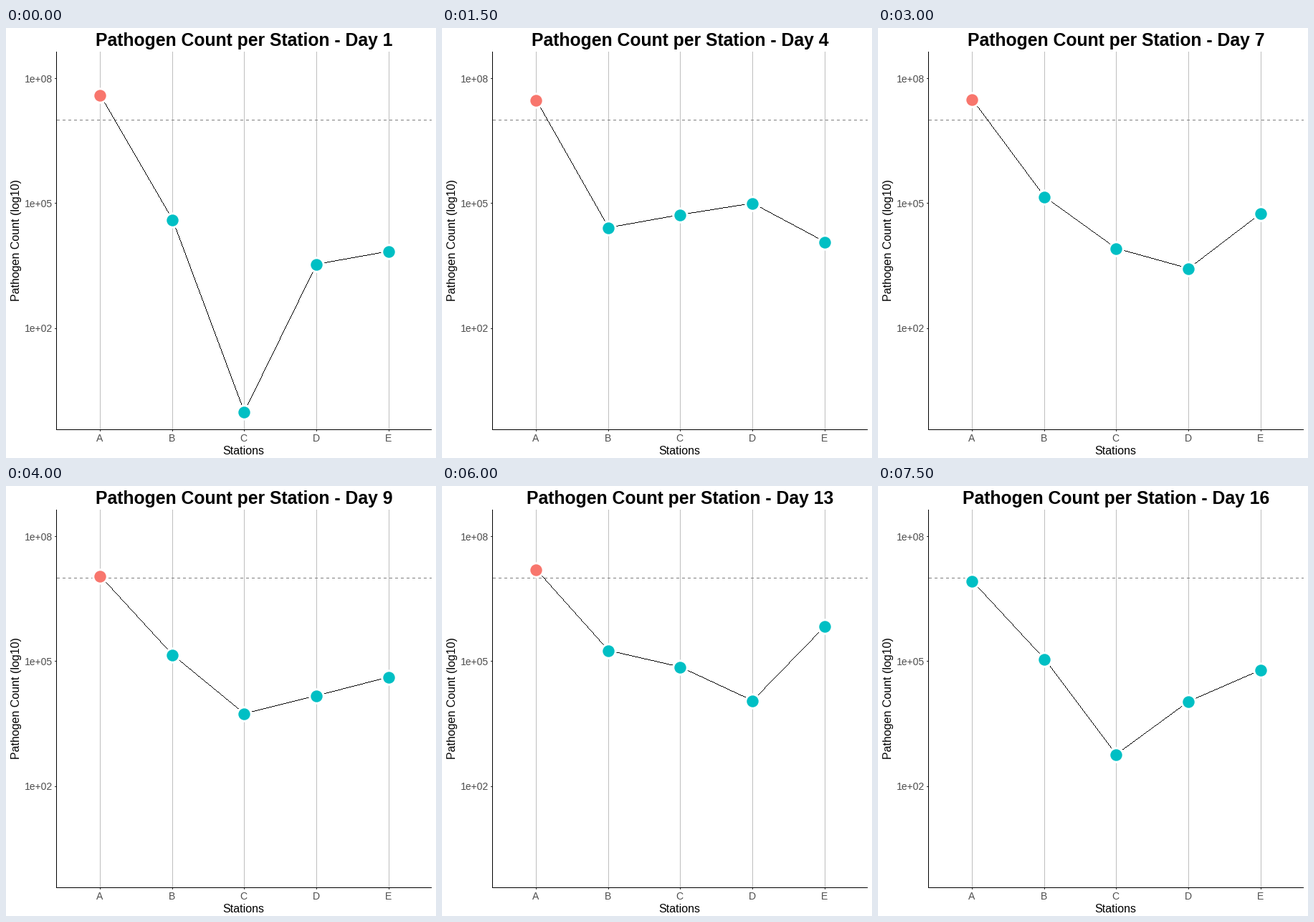
A matplotlib script that plays this animation: 600x600 px, repeating every 8000 ms.

```python
import matplotlib.pyplot as plt
import numpy as np
from matplotlib.animation import FuncAnimation
from matplotlib.patches import Circle

PX = 0.72  # points per pixel at 100 dpi
RED, TEAL, GREY = "#F8766D", "#00BFC4", "#4D4D4D"
LEFT, RIGHT, TOP, BOTTOM = 70, 593, 33, 560
N_DAYS = 16

# Marker heights (pixel rows, stations A to E) on key days
KEYS = {
    1: (94, 268, 536, 330, 312),
    4: (101, 279, 261, 245, 299),
    7: (100, 236, 308, 336, 259),
    9: (126, 236, 318, 293, 267),
    11: (106, 261, 373, 231, 248),
    13: (117, 230, 253, 300, 196),
    16: (133, 242, 375, 301, 257),
}


def row(power):
    """Pixel row of 10**power on the log axis."""
    return int(70 + 58.2 * (8 - power))


def heights(day):
    """Marker rows for a day, blended between the key days."""
    return [round(np.interp(day, list(KEYS), ys)) for ys in zip(*KEYS.values())]


STATIONS = [round(131 + 100.75 * i) for i in range(5)]
LIMIT = row(7)

plt.rcParams["font.family"] = "Liberation Sans"
fig = plt.figure(figsize=(6, 6), dpi=100, facecolor="white")
ax = fig.add_axes([0, 0, 1, 1])
ax.set_xlim(0, 600)
ax.set_ylim(600, 0)
ax.axis("off")


def line(xs, ys, color, z, **kw):
    """Crisp one-pixel line; both end pixels are included."""
    ax.plot(xs, ys, color=color, lw=PX, zorder=z,
            solid_capstyle="projecting", **kw)


def label(x, y, s, size, color="black", **kw):
    kw = {"ha": "center", "va": "baseline", **kw}
    return ax.text(x, y, s, fontsize=size * PX, color=color, **kw)


def disc(r, color, z):
    return ax.add_patch(Circle((0, 0), r, fc=color, ec="none", zorder=z))


def pixel_path(xs, ys):
    """Pixels of a hard-edged line through the given points."""
    px, py = [], []
    for x0, x1, y0, y1 in zip(xs, xs[1:], ys, ys[1:]):
        n = max(abs(x1 - x0), abs(y1 - y0)) + 1
        px.append(np.rint(np.linspace(x0, x1, n)))
        py.append(np.rint(np.linspace(y0, y1, n)))
    return np.concatenate(px), np.concatenate(py)


for x, name in zip(STATIONS, "ABCDE"):
    line([x, x], [TOP, BOTTOM], "#BEBEBE", 1)
    line([x, x], [BOTTOM + 1, BOTTOM + 2], "#333333", 1)
    label(x - 0.4, 577, name, 14, GREY)

for power in (8, 5, 2):
    y = row(power)
    line([LEFT - 2, LEFT], [y, y], "#333333", 1)
    label(65, y + 5.5, f"1e+{power:02d}", 14, GREY, ha="right")

line([LEFT + 1, RIGHT + 1], [LIMIT + 0.5] * 2, "#7F7F7F", 2,
     dashes=(4, 4), dash_capstyle="butt", snap=False)
line([LEFT, LEFT], [TOP, BOTTOM], "black", 6)
line([LEFT, RIGHT], [BOTTOM, BOTTOM], "black", 6)

label(331.5, 595, "Stations", 16)
label(15, 296, "Pathogen Count (log10)", 16, rotation=90, va="center")
title = label(332, 25, "", 24.7, weight="bold")

path, = ax.plot([], [], ",", color="black", zorder=3)
halos = [disc(11.2, "white", 4) for _ in STATIONS]
dots = [disc(8.2, TEAL, 5) for _ in STATIONS]


def draw(i):
    ys = heights(i + 1)
    title.set_text(f"Pathogen Count per Station - Day {i + 1}")
    path.set_data(*pixel_path(STATIONS, ys))
    for x, y, halo, dot in zip(STATIONS, ys, halos, dots):
        halo.center = dot.center = (x + 0.5, y + 0.5)
        dot.set_facecolor(RED if y < LIMIT else TEAL)
    return [title, path, *halos, *dots]


anim = FuncAnimation(fig, draw, frames=N_DAYS, interval=500,
                     repeat=True, repeat_delay=0, blit=False)
plt.show()
```
